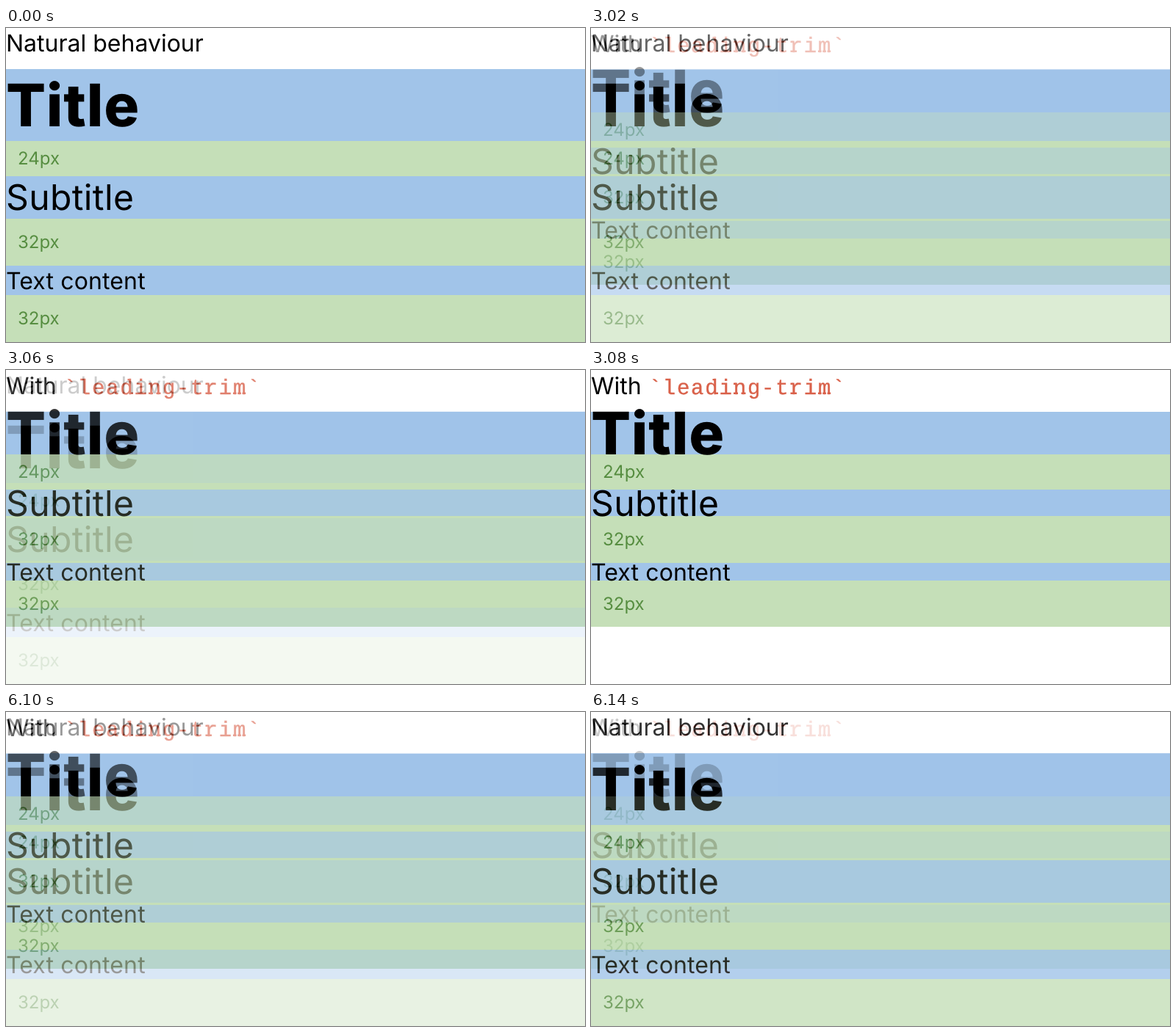
Write an HTML page that moves like this. It is 788x428 px and loops after 6.16 s.

```html
<!DOCTYPE html>
<html lang="en">
<head>
<meta charset="utf-8">
<title>Leading trim comparison</title>
<style>
  html, body { margin: 0; width: 100%; height: 100%; overflow: hidden; background: #fff; }
  svg { display: block; width: 788px; height: 428px; }
  text {
    font-family: Inter, sans-serif;
    font-size: 32px;
    font-optical-sizing: none;
    text-rendering: geometricPrecision;
  }
  .title { font-size: 80px; font-weight: 800; letter-spacing: .009em; }
  .subtitle { font-size: 48px; letter-spacing: .008em; }
  .body { letter-spacing: .004em; }
  .label { font-size: 24px; fill: #568d40; }
  .code {
    font-family: "Liberation Mono", monospace;
    font-size: 29px;
    letter-spacing: 1.8px;
    fill: #d9614a;
    stroke: #d9614a;
    stroke-width: .4;
  }
  .slabs { fill: none; stroke: #d9614a; stroke-width: 2.4; }
  .box { fill: #a1c4e9; }
  .gap { fill: #c5dfb8; }

  #trimmed { opacity: 0; animation: crossfade 6160ms step-end infinite; }
  @keyframes crossfade {
    0% { opacity: 0; }
    48.7012% { opacity: .2; }
    49.0259% { opacity: .4; }
    49.3506% { opacity: .6; }
    49.6753% { opacity: .8; }
    50% { opacity: 1; }
    98.7012% { opacity: .8; }
    99.0259% { opacity: .6; }
    99.3506% { opacity: .4; }
    99.6753% { opacity: .2; }
    100% { opacity: 0; }
  }
</style>
</head>
<body>
<svg viewBox="0 0 788 428">
  <g id="natural">
    <rect width="788" height="428" fill="#fff"/>
    <text y="32">Natural behaviour</text>
    <rect class="box" y="56" width="788" height="98"/>
    <rect class="gap" y="154" width="788" height="48"/>
    <rect class="box" y="202" width="788" height="58"/>
    <rect class="gap" y="260" width="788" height="64"/>
    <rect class="box" y="324" width="788" height="40"/>
    <rect class="gap" y="364" width="788" height="64"/>
    <text class="title" y="134">Title</text>
    <text class="label" x="16" y="186">24px</text>
    <text class="subtitle" y="248">Subtitle</text>
    <text class="label" x="16" y="300">32px</text>
    <text class="body" y="356">Text content</text>
    <text class="label" x="16" y="404">32px</text>
  </g>
  <g id="trimmed">
    <rect width="788" height="428" fill="#fff"/>
    <text y="33">With</text>
    <text class="code" x="78.5" y="33">`leading-trim`</text>
    <!-- slab serifs on d, n, r and m -->
    <path class="slabs" d="M165.5 13.1h3M169 31.8h4M194 18.8h3M194 31.8h6M204.5 31.8h6M271.5 18.8h3M271.5 31.8h8.5M309 31.8h4.6M315.3 31.8h4.6M321.6 31.8h4.6"/>
    <rect class="box" y="57" width="788" height="58"/>
    <rect class="gap" y="115" width="788" height="48"/>
    <rect class="box" y="163" width="788" height="36"/>
    <rect class="gap" y="199" width="788" height="64"/>
    <rect class="box" y="263" width="788" height="24"/>
    <rect class="gap" y="287" width="788" height="63"/>
    <text class="title" y="115">Title</text>
    <text class="label" x="16" y="147">24px</text>
    <text class="subtitle" y="199">Subtitle</text>
    <text class="label" x="16" y="239">32px</text>
    <text class="body" y="287">Text content</text>
    <text class="label" x="16" y="327">32px</text>
  </g>
</svg>
</body>
</html>
```
